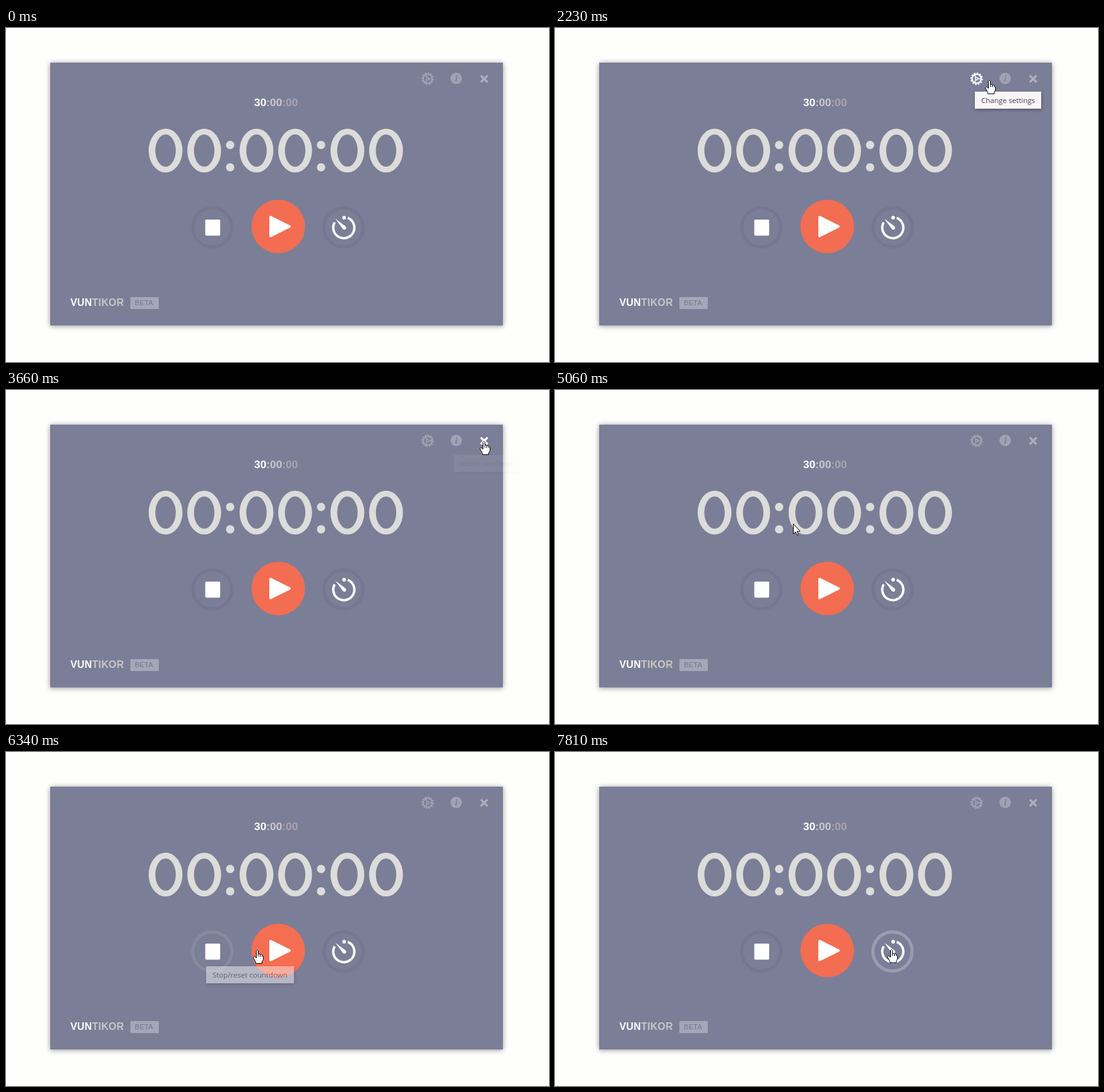
These frames come from a looping animation (860 by 530 pixels, 8 s). An HTML page:

```html
<!DOCTYPE html>
<html lang="en">
<head>
<meta charset="utf-8">
<title>Countdown timer</title>
<style>
  html, body { margin: 0; width: 100%; height: 100%; overflow: hidden; background: #fefefd; }
  body { position: relative; }
  svg { position: absolute; left: 0; top: 0; }
  .panel { position: absolute; left: 70px; top: 55px; width: 717px; height: 417px;
    background: #7b7e97; box-shadow: 0 1px 8px rgba(0, 0, 0, .42); }
  .tip { position: absolute; height: 27px; padding: 0 10px; white-space: nowrap;
    font: 11.5px/27px "Open Sans", "Noto Sans", sans-serif; color: #444;
    background: #f8f5f8; box-shadow: 1px 2px 5px rgba(0, 0, 0, .3); opacity: 0; }
  text { font-family: "Liberation Sans", Arial, sans-serif; }
  .bold { font-weight: bold; }
</style>
</head>
<body>
<div class="panel"></div>

<svg width="860" height="530" viewBox="0 0 860 530">
  <g id="gear" transform="translate(667.8 80.5)" fill="none" stroke="#fff">
    <circle r="7.2" stroke-width="2.2"/>
    <circle r="8.9" stroke-width="2" pathLength="24" stroke-dasharray="1.1 .9"/>
    <circle r="1.9" stroke-width="1.5"/>
    <path d="M2 0H7M-1 -1.7L-3.5 -6.1M-1 1.7L-3.5 6.1" stroke-width="1.6"/>
  </g>
  <g id="info">
    <circle cx="713" cy="80" r="9.1" fill="#fff"/>
    <text x="713" y="85" text-anchor="middle" fill="#7b7e97"
      style="font: italic bold 15px 'Liberation Serif', serif">i</text>
  </g>
  <path id="close" d="M752 75.3L762.6 86M762.6 75.3L752 86" stroke="#fff" stroke-width="3.3"/>

  <text class="bold" x="393" y="124" font-size="17.33" fill="#fff">30<tspan fill="#cac7cb">:00</tspan><tspan fill="#aba4af">:00</tspan></text>
  <g id="clock" role="img" aria-label="00:00:00" fill="#dcdcda"></g>

  <g fill="none" stroke-width="5">
    <circle cx="326.7" cy="316.5" r="31" stroke="#74778f"/>
    <circle id="stopRing" cx="326.7" cy="316.5" r="31" stroke="#fff"/>
    <circle cx="534.6" cy="316.5" r="31" stroke="#74778f"/>
    <circle id="timerRing" cx="534.6" cy="316.5" r="31" stroke="#fff"/>
  </g>
  <rect x="315.6" y="304" width="23.6" height="25.4" rx="1.6" fill="#fff"/>
  <circle id="play" cx="431.2" cy="315" r="42.5"/>
  <path d="M419 300L449 315 419 330Z" fill="#fff" stroke="#fff" stroke-width="4" stroke-linejoin="round"/>
  <g fill="#fff">
    <path d="M541.2 301.3A16.7 16.7 0 1 1 520.6 308.4" fill="none" stroke="#fff" stroke-width="3.8"/>
    <circle cx="535.5" cy="301" r="2.9"/>
    <path d="M521.5 302.6L537.4 314.4A3 3 0 1 1 533.2 318.4Z"/>
  </g>

  <g letter-spacing=".3">
    <text class="bold" x="102" y="441" font-size="15.8" fill="#fff">VUN<tspan fill="#c9c6c6">TIKOR</tspan></text>
    <rect x="197" y="427" width="45" height="19" rx="1" fill="#a5a6b7"/>
    <text x="204" y="440" font-size="11" fill="#74778f">BETA</text>
  </g>
</svg>

<div class="tip" id="gearTip" style="left:665px;top:101px">Change settings</div>
<div class="tip" id="infoTip" style="left:709px;top:103px">About VunTikor</div>
<div class="tip" id="closeTip" style="left:755px;top:101px">Exit VunTikor</div>
<div class="tip" id="stopTip" style="left:317px;top:340px">Stop/reset countdown</div>
<div class="tip" id="playTip" style="left:410px;top:333px">Start/pause countdown</div>

<svg width="860" height="530" viewBox="0 0 860 530">
  <g id="cursor" fill="#fff" stroke="#000">
    <path id="arrow" d="M.5 .5V16.5L4 13.2 6.4 18.5 8.6 17.6 6.3 12.2H11.2Z"/>
    <path id="hand" d="M-1.5 1.5L-.5 .5H.5L1.5 1.5V6.5H3.5L4.5 7.5H6.5L7.5 8.5H8.5L9.5 9.5V15.5L7.5 18.5V21.5H-2.5V19.5L-6 13V11.5L-5 10.5H-4L-1.5 13ZM1.5 6.5V10.5M4.5 7.5V11M7.5 8.5V11"/>
  </g>
</svg>

<script>
const LOOP = 8000;
const $ = id => document.getElementById(id);

// Bursts of movement: start, end, number of steps.
const bursts = [
  [70, 840, 11], [920, 1470, 8], [1610, 1750, 3], [1960, 2620, 9],
  [2860, 3030, 3], [3270, 3660, 6], [3890, 4060, 3], [4360, 5150, 11],
  [5230, 5470, 4], [5700, 6480, 11], [6710, 7010, 5], [7410, 7810, 6]
];

// Pointer path: time, x, y.
const path = [
  [70, 728, 518], [840, 582, 209], [1310, 667, 81], [1880, 667, 81],
  [2207, 688, 83], [2450, 711, 84], [3190, 711, 84], [3500, 757, 81],
  [4280, 757, 81], [5071, 377, 212], [5150, 362, 236], [5390, 319, 321],
  [5850, 319, 321], [6324, 398, 314], [6480, 412, 314], [7330, 412, 314],
  [7650, 533, 313]
];

// Fade windows: in from, in to, out from, out to.
const hovers = {
  gear: [1230, 1470, 2300, 2620], info: [2380, 2620, 3350, 3600],
  close: [3430, 3660, 4430, 4700], stop: [5310, 5470, 6200, 6450],
  play: [6200, 6480, 7490, 7730], timer: [7570, 7810, 9000, 9100]
};
const tips = {
  gearTip: [1540, 1750, 2290, 2540], infoTip: [2780, 3030, 3350, 3682],
  closeTip: [3810, 4060, 4430, 4680], stopTip: [5620, 5850, 6230, 6410],
  playTip: [6640, 7010, 7490, 7750]
};

const ramp = (t, a, b) => Math.max(0, Math.min(1, (t - a) / (b - a)));
const fade = (t, [a, b, c, d]) => ramp(t, a, b) - ramp(t, c, d);
const mix = (a, b, k) => a + (b - a) * k;

function snap(t) {
  const burst = bursts.filter(b => b[0] <= t).pop();
  if (!burst) return 0;
  const [start, end, count] = burst;
  const step = (end - start) / (count - 1);
  return Math.min(end, start + Math.floor((t - start) / step + .25) * step);
}

function pointerAt(t) {
  const next = path.findIndex(p => p[0] > t);
  if (next < 0) return path[path.length - 1].slice(1);
  const to = path[next], from = path[Math.max(0, next - 1)];
  const k = ramp(t, from[0], to[0]);
  return [1, 2].map(i => Math.round(mix(from[i], to[i], k)));
}

function render(time) {
  const t = snap(time);
  const level = name => fade(t, hovers[name]);

  for (const [name, rest] of [["gear", .28], ["info", .28], ["close", .38]])
    $(name).style.opacity = mix(rest, 1, level(name));
  $("stopRing").style.opacity = .28 * level("stop");
  $("timerRing").style.opacity = .28 * level("timer");
  const glow = level("play");
  $("play").style.fill = `rgb(${mix(242, 249, glow)}, ${mix(109, 111, glow)}, 82)`;
  for (const name in tips) $(name).style.opacity = fade(t, tips[name]);

  const [x, y] = pointerAt(t);
  const between = (x > 361 && x < 388) || (x > 474 && x < 501);
  const isHand = (t >= 1300 && t < 4400) || (t >= 5380 && !between);
  $("cursor").style.display = t < 70 ? "none" : "";
  $("cursor").setAttribute("transform", `translate(${x} ${y})`);
  $("hand").style.display = isHand ? "" : "none";
  $("arrow").style.display = isHand ? "none" : "";
}

const oval = (x, rx, ry) => `M${x - rx} 194.5a${rx} ${ry} 0 1 1 ${2 * rx} 0a${rx} ${ry} 0 1 1 ${-2 * rx} 0Z`;
const zero = x => `<path fill-rule="evenodd" d="${oval(x, 26.8, 34.8)}${oval(x, 16.2, 25.6)}"/>`;
const dot = (x, y) => `<circle cx="${x}" cy="${y}" r="6.6"/>`;
$("clock").innerHTML = [252.7, 396.7, 540.7].map(x => zero(x) + zero(x + 61.2)).join("") +
  [355, 499].map(x => dot(x, 185.7) + dot(x, 221)).join("");

const started = performance.now();
function tick() {
  render((performance.now() - started) % LOOP);
  requestAnimationFrame(tick);
}
tick();
</script>
</body>
</html>
```
